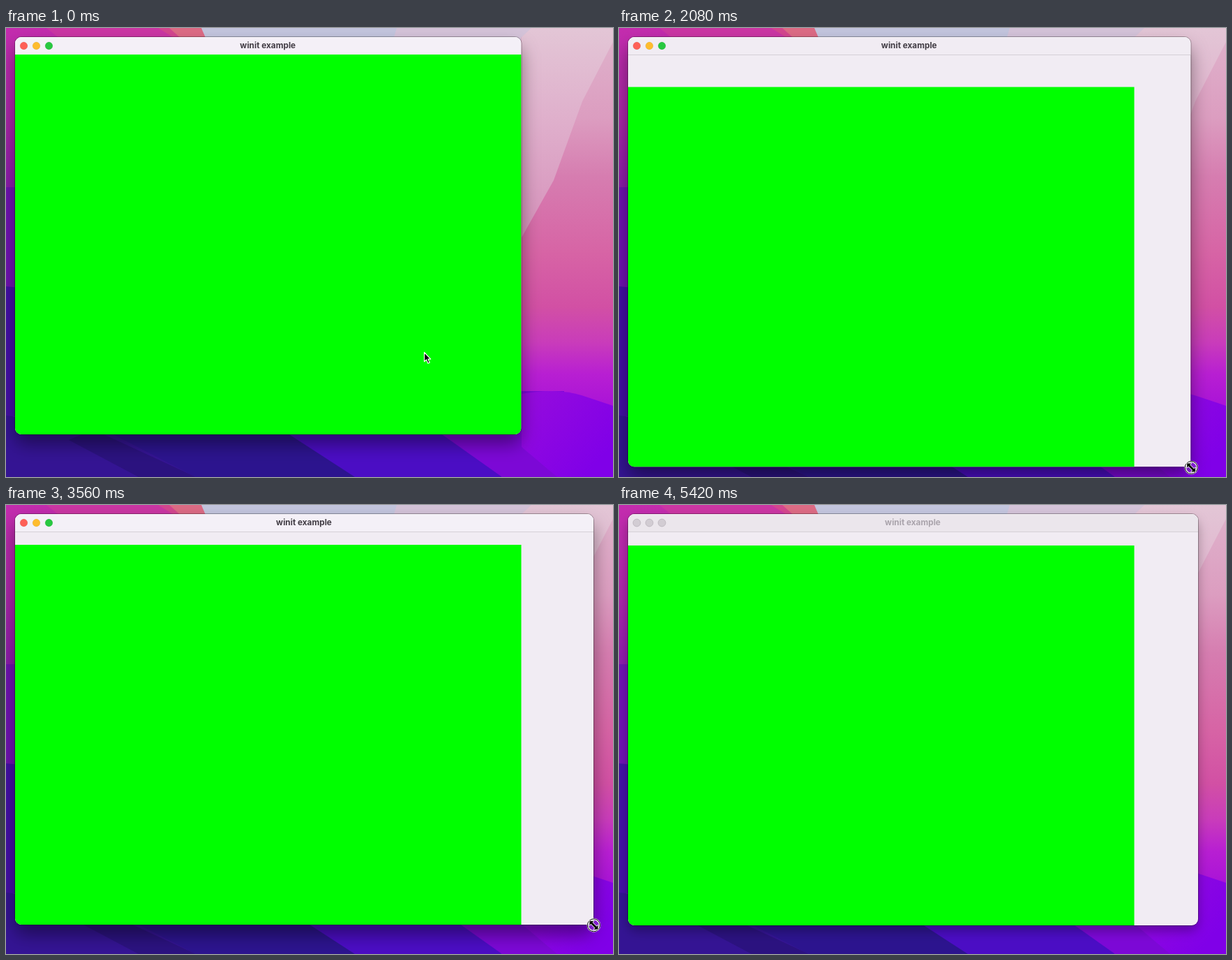
Write an HTML page that moves like this. It is 870 by 643 pixels and loops after 5.44 s.

```html
<!DOCTYPE html>
<html lang="en">
<head>
<meta charset="utf-8">
<title>Window resize</title>
<style>
html, body { margin: 0; width: 100%; height: 100%; overflow: hidden; }
svg { display: block; width: 870px; height: 643px; }
text { font: 700 11.8px Inter, "Open Sans", sans-serif; text-anchor: middle; }
</style>
</head>
<body>
<svg viewBox="0 0 870 643">
  <defs>
    <linearGradient id="sky" gradientUnits="userSpaceOnUse" x1="0" y1="0" x2="0" y2="643">
      <stop offset="0" stop-color="#dfb4cc"/>
      <stop offset=".2" stop-color="#dc9dc0"/>
      <stop offset=".33" stop-color="#d67db0"/>
      <stop offset=".5" stop-color="#d764a5"/>
      <stop offset=".62" stop-color="#d250a4"/>
      <stop offset=".7" stop-color="#c93cba"/>
      <stop offset=".77" stop-color="#b81fd2"/>
      <stop offset=".85" stop-color="#a812d8"/>
    </linearGradient>
    <linearGradient id="pale" gradientUnits="userSpaceOnUse" x1="0" y1="0" x2="0" y2="310">
      <stop offset="0" stop-color="#e3c6d6"/>
      <stop offset=".45" stop-color="#dfaecb"/>
      <stop offset="1" stop-color="#d68fba"/>
    </linearGradient>
    <linearGradient id="hill" gradientUnits="userSpaceOnUse" x1="740" y1="520" x2="850" y2="620">
      <stop offset="0" stop-color="#960cdc"/>
      <stop offset="1" stop-color="#8000e8"/>
    </linearGradient>
    <linearGradient id="side" gradientUnits="userSpaceOnUse" x1="0" y1="0" x2="0" y2="228">
      <stop offset="0" stop-color="#c42cae"/>
      <stop offset=".6" stop-color="#a926a8"/>
      <stop offset="1" stop-color="#8c1cac"/>
    </linearGradient>
    <filter id="soft" filterUnits="userSpaceOnUse" x="-60" y="-60" width="990" height="780">
      <feGaussianBlur id="blur" stdDeviation="13"/>
    </filter>
    <clipPath id="clip"><rect id="clipBox" x="13" y="13" rx="9"/></clipPath>
  </defs>

  <g id="wallpaper">
    <path fill="url(#sky)" d="M0 0H870V643H0Z"/>
    <path fill="url(#pale)" d="M739 0H870V20L826 105 785 218 739 300Z"/>
    <path fill="#c3c5de" d="M270 0H560V40H270Z"/>
    <path fill="#d4c3d9" d="M560 0H753L738 14V40H548Z"/>
    <path fill="#dd6b85" d="M230 0H280L286 14V40H230Z"/>
    <path fill="#d4468f" d="M170 0H234L252 16V40H170Z"/>
    <path fill="#cb36a4" d="M50 0H218L244 16V40H50Z"/>
    <path fill="url(#side)" d="M0 0H58L78 16V40L13 80V228H0Z"/>
    <path fill="#7013b2" d="M0 228H40V372H0Z"/>
    <path fill="#4410a6" d="M0 370L40 374V556H0Z"/>
    <path fill="#341493" d="M0 555L180 575 560 560V643H0Z"/>
    <path fill="#2b127f" d="M125 575L272 643H190L90 590Z"/>
    <path fill="#2c148e" d="M140 575H430L500 643H272Z"/>
    <path fill="#4b0dc4" d="M395 575H650L711 643H500Z"/>
    <path fill="#7c08d6" d="M615 575L739 520H800V643H711Z"/>
    <path fill="url(#hill)" d="M739 524Q790 515 825 526L870 541V643H790L739 600Z"/>
  </g>

  <rect id="shadow" x="13" rx="12" filter="url(#soft)"/>
  <rect id="edge" x="12.5" y="12.5" rx="9.5" fill="none" stroke="#000" stroke-opacity=".3"/>
  <g clip-path="url(#clip)">
    <rect id="pane" x="13" y="13" fill="#f1ecf3"/>
    <rect id="bar" x="13" y="13" height="25"/>
    <rect id="line" x="13" y="38" height="1" fill="#d5d0d7"/>
    <rect id="green" x="13" width="725.5" height="544" fill="#0f0"/>
    <rect id="shine" x="13" y="13" height="1" fill="#fff" opacity=".5"/>
  </g>
  <g id="lights"></g>
  <text id="title" y="29">winit example</text>

  <path id="arrow" fill="#000" stroke="#fff" stroke-width="1.2" stroke-linejoin="round"
    d="M0 0V13.2L3 10.4 5.3 15.8 7.7 14.8 5.4 9.6H9.2Z"/>
  <g id="grip">
    <circle r="8.6" fill="#fff" fill-opacity=".12" stroke="#fff" stroke-width="2.6"/>
    <circle r="9" fill="none" stroke="#000" stroke-width="1"/>
    <path fill="#000" stroke="#fff" stroke-width="1.6" stroke-linejoin="round" paint-order="stroke"
      d="M-6 -6H0L-2 -4 4 2 6 0V6H0L2 4 -4 -2 -6 0Z"/>
  </g>
</svg>
<script>
const LOOP = 5440, IDLE = 5420;
const $ = id => document.getElementById(id);
const set = (id, attrs) => {
  for (const k in attrs) $(id).setAttribute(k, attrs[k]);
};
const move = (id, x, y) => set(id, { transform: `translate(${x} ${y})` });
const show = (id, on) => set(id, { visibility: on ? "visible" : "hidden" });

// The screen refreshes about every 150 ms, with a few shorter steps.
const short = [600, 1190, 2530, 3270, 4760];
const ticks = [0];
for (let t = 0; t < 4900;) ticks.push(t += short.includes(t) ? 140 : 150);

// Bottom right corner of the window: time, x, y.
const drag = [
  [1190, 738.5, 582], [1330, 745, 588], [1480, 766, 603], [1780, 800, 621],
  [2080, 819.5, 628.5], [2230, 822, 629], [2380, 814, 621], [2530, 794, 607],
  [2670, 779, 594], [2820, 786, 587], [2970, 813, 587], [3120, 835.5, 590],
  [3270, 846, 594], [3560, 842, 601], [3800, 840, 595], [4010, 847, 591],
  [4310, 839, 600], [4610, 829, 605], [4900, 830, 602]
];

function corner(t) {
  const i = drag.findIndex(k => k[0] > t);
  if (i === 0) return drag[0].slice(1);
  if (i < 0) return drag[drag.length - 1].slice(1);
  const [a, b] = [drag[i - 1], drag[i]];
  const p = (t - a[0]) / (b[0] - a[0]);
  return [a[1] + (b[1] - a[1]) * p, a[2] + (b[2] - a[2]) * p];
}

const colors = ["#fe5f57", "#febc2e", "#28c840"];
$("lights").innerHTML = colors.map((c, i) =>
  `<circle cx="${25.5 + 18 * i}" cy="25.5" r="5.4"/>`).join("");
const lights = [...$("lights").children];

function drawWindow(t, active) {
  const [x, y] = corner(t);
  const width = x - 13, height = y - 13;
  for (const id of ["clipBox", "pane"]) set(id, { width, height });
  for (const id of ["bar", "line", "shine"]) set(id, { width });
  set("edge", { width: width + 1, height: height + 1 });
  set("shadow", {
    y: active ? 27 : 21, width, height,
    "fill-opacity": active ? .42 : .3
  });
  set("blur", { stdDeviation: active ? 13 : 8 });
  set("green", { y: y - 544 });
  const lit = t < 1330 || t > 2400 ? "#f4f0f7" : "#f1ecf3";
  set("bar", { fill: active ? lit : "#ebe6ec" });
  set("title", { x: 13 + width / 2 - .5, fill: active ? "#423d45" : "#aaa4ac" });
  lights.forEach((c, i) => {
    c.setAttribute("fill", active ? colors[i] : "#d2ccd3");
    c.setAttribute("stroke", active ? "#000" : "#b9b3ba");
    c.setAttribute("stroke-opacity", active ? .08 : 1);
    c.setAttribute("stroke-width", .8);
  });
}

function drawCursor(t, active) {
  const gripping = t >= 890;
  show("arrow", active && !gripping);
  show("grip", active && gripping);
  if (!gripping) {
    const p = t / 890, e = p * p * (3 - 2 * p);
    move("arrow", 599.5 + 134 * e, 464.5 + 118 * e);
  } else if (t < 1330) {
    move("grip", 733.5, 583);
  } else {
    // The pointer runs ahead when the window is pulled back in quickly.
    const [x, y] = corner(t + (t > 2300 && t < 2700 ? 100 : 10));
    move("grip", x + .5, y + 1);
  }
}

function draw(ms) {
  const now = ms % LOOP;
  const t = ticks.filter(k => k <= now).pop();
  const active = now < IDLE;
  drawWindow(t, active);
  drawCursor(t, active);
}

const start = performance.now();
function loop() {
  draw(performance.now() - start);
  requestAnimationFrame(loop);
}
loop();
</script>
</body>
</html>
```
